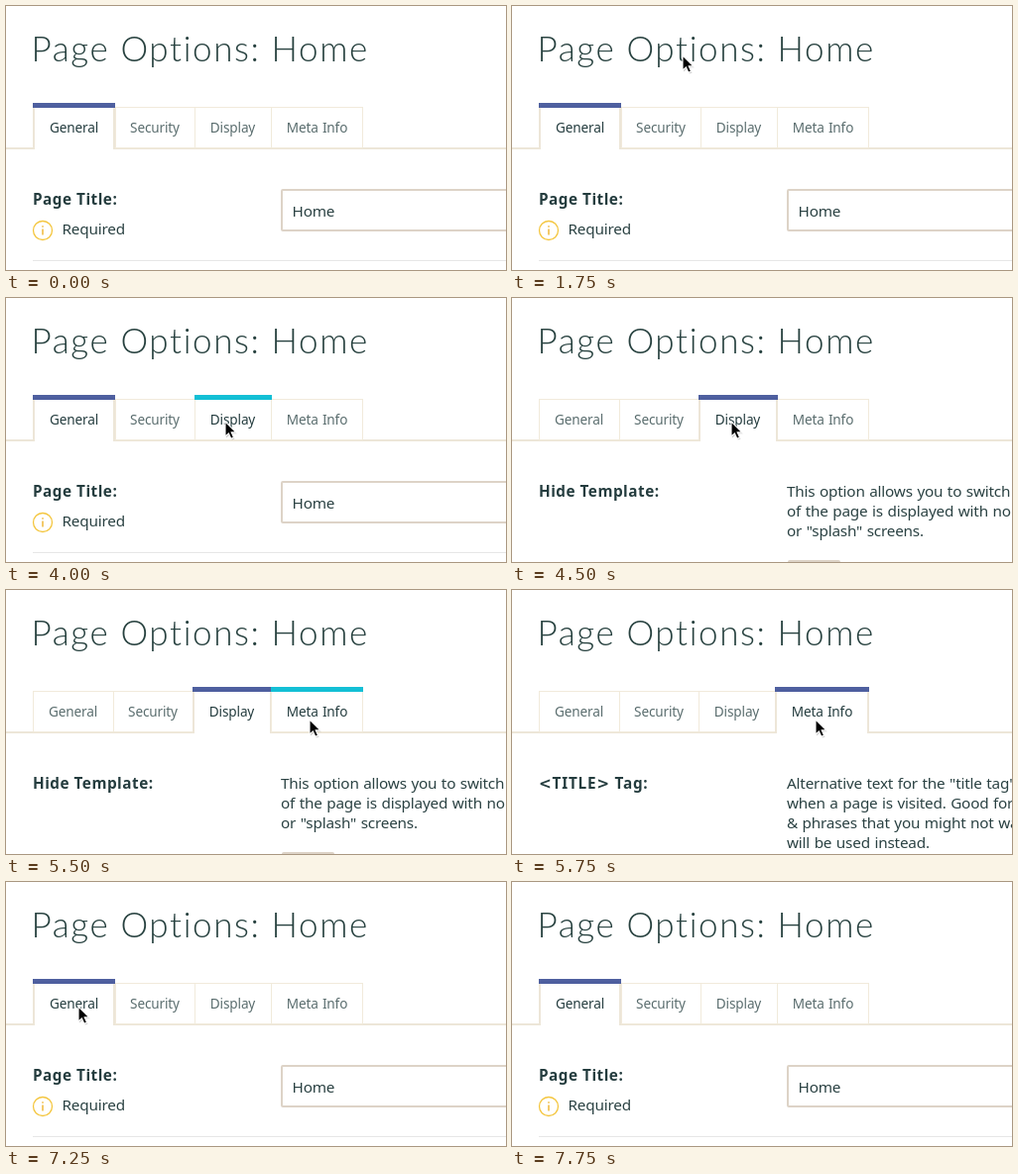
These frames come from a looping animation (504x267 px, 9.5 s). An HTML page:

```html
<!DOCTYPE html>
<html lang="en">
<head>
<meta charset="utf-8">
<title>Page options tabs</title>
<style>
  html, body { margin: 0; width: 100%; height: 100%; overflow: hidden; background: #fff; }
  svg { display: block; width: 100vw; height: 100vh; }
  text { font-family: "Noto Sans", "Open Sans", sans-serif; font-size: 15.3px; letter-spacing: -.2px; word-spacing: .8px; fill: #2b4243; white-space: pre; }
  .title { font: 300 35px Lato, "Open Sans", sans-serif; letter-spacing: 1.6px; word-spacing: 0; fill: #27413f; }
  .label { font-weight: 700; letter-spacing: .5px; word-spacing: 0; fill: #243c3e; }
  .angle { font-family: "DejaVu Sans", sans-serif; }
  .tab text { font-size: 13.6px; letter-spacing: -.15px; text-anchor: middle; fill: #5b6e6f; }
  .tab.lit text { fill: #263e40; }
  .edge { fill: #fff; stroke: #f1eadb; }
  .side { fill: #ede6d8; }
</style>
</head>
<body>
<svg viewBox="0 0 504 267" xmlns="http://www.w3.org/2000/svg">
  <rect width="504" height="267" fill="#fff"/>
  <text class="title" x="25.5" y="56">Page Options: Home</text>
  <rect class="side" y="143" width="504" height="2"/>
  <g id="tabs"></g>

  <g class="panel">
    <text class="label" x="27" y="201">Page Title:</text>
    <circle cx="37" cy="227" r="9.5" fill="none" stroke="#f4c63f" stroke-width="1.3"/>
    <path d="M37 225.5v6M37 222.2v1.6" stroke="#f0b93a" stroke-width="1.5"/>
    <text x="56.5" y="231">Required</text>
    <rect x="278" y="186" width="240" height="41" rx="1" fill="#fff" stroke="#ddd3c7" stroke-width="2"/>
    <text x="288.5" y="213">Home</text>
    <rect x="27" y="257" width="477" height="1" fill="#e6e6e6"/>
  </g>
  <g class="panel">
    <text class="label" x="27" y="201">Hide Template:</text>
    <text x="277" y="201">This option allows you to switch</text>
    <text x="277" y="221">of the page is displayed with no</text>
    <text x="277" y="241">or "splash" screens.</text>
    <rect x="278" y="265" width="53" height="8" rx="2" fill="#ddd3c7"/>
  </g>
  <g class="panel">
    <text class="label" x="27" y="201" style="letter-spacing:.75px"><tspan class="angle">&lt;</tspan>TITLE<tspan class="angle">&gt;</tspan> Tag:</text>
    <text x="277" y="201">Alternative text for the "title tag"</text>
    <text x="277" y="221">when a page is visited. Good for</text>
    <text x="277" y="241">&amp; phrases that you might not want</text>
    <text x="277" y="261">will be used instead.</text>
  </g>

  <g id="cursor">
    <path d="M1 2V16.5L4.3 13.4 6.8 18.6 9.5 17.4 7.2 12.2H11.8Z" fill="#000" opacity=".2"/>
    <path d="M0 0V15L3.4 11.9 5.8 17.3 8.5 16.1 6.2 10.9H10.8Z" fill="#000" stroke="#fff" stroke-width="1.1"/>
  </g>
</svg>
<script>
const LOOP = 9500, STEP = 250, HIDDEN = null;
const TABS = [["General", 81], ["Security", 80], ["Display", 77], ["Meta Info", 93]];
const PANEL_TAB = [0, 2, 3];

// [start time, pointer positions held one step each]
const MOVES = [
  [0, [HIDDEN]],
  [750, [[320, -3], [308, 9], [301, 19]]],
  [1750, [[172, 50], [158, 84], [146, 113], [145, 125], [157, 129]]],
  [3000, [[236, 134], [302, 132], [318, 129], [286, 127], [221, 125]]],
  [4750, [[228, 127], [252, 130], [285, 132], [306, 131]]],
  [6000, [[243, 130], [143, 128], [73, 126]]],
  [7500, [[110, 31], HIDDEN]]
];
const CLICKS = [[0, 0], [4500, 2], [5750, 3], [7250, 0]];

const make = (name, parent, attrs) => {
  const el = document.createElementNS("http://www.w3.org/2000/svg", name);
  parent.appendChild(el);
  return set(el, attrs);
};
function set(el, attrs) {
  for (const key in attrs) el.setAttribute(key, attrs[key]);
  return el;
}
const show = (el, on) => el.setAttribute("visibility", on ? "visible" : "hidden");
const latest = (list, t) => list.filter(item => item[0] <= t).pop();

const cursor = document.getElementById("cursor");
const panels = [...document.querySelectorAll(".panel")];
const tabs = TABS.map(([name]) => {
  const g = make("g", document.getElementById("tabs"), { class: "tab" });
  const tab = {
    g,
    edge: make("rect", g, { class: "edge", y: 102.5, height: 41 }),
    fill: make("rect", g, { fill: "#fff", y: 98, height: 47 }),
    left: make("rect", g, { class: "side", y: 102, width: 2, height: 43 }),
    right: make("rect", g, { class: "side", y: 102, width: 2, height: 43 }),
    bar: make("rect", g, { y: 98, height: 5 }),
    text: make("text", g, { y: 128 })
  };
  tab.text.textContent = name;
  return tab;
});

function pointerAt(t) {
  const [start, points] = latest(MOVES, t);
  return points[Math.min(points.length - 1, Math.floor((t - start) / STEP))];
}

function draw(t) {
  const active = latest(CLICKS, t)[1];
  const point = pointerAt(t);
  let x = 27;

  tabs.forEach((tab, i) => {
    const on = i === active;
    const last = i === tabs.length - 1;
    const w = TABS[i][1] + (on ? 2 : 0);
    const over = !!point && point[1] >= 102 && point[1] < 143 && point[0] >= x && point[0] < x + w;
    const full = last ? w : w + (on && i === 0 ? 0 : 1);
    set(tab.edge, { x: x + .5, width: full - 1 });
    set(tab.fill, { x, width: full });
    set(tab.left, { x });
    set(tab.right, { x: x + full - 2 });
    set(tab.bar, { x, width: full, fill: on ? "#4e5f9f" : "#13bfd5" });
    set(tab.text, { x: x + w / 2 });
    set(tab.g, { class: on || over ? "tab lit" : "tab" });
    [tab.fill, tab.left, tab.right].forEach(el => show(el, on));
    show(tab.edge, !on);
    show(tab.bar, on || over);
    x += w;
  });
  // Raised tab covers its neighbours' edges.
  const parent = tabs[0].g.parentNode;
  if (parent.lastChild !== tabs[active].g) parent.appendChild(tabs[active].g);
  const lit = tabs.find((tab, i) => i !== active && tab.g.getAttribute("class") === "tab lit");
  if (lit) parent.appendChild(lit.g);

  panels.forEach((panel, i) => show(panel, PANEL_TAB[i] === active));
  show(cursor, !!point);
  if (point) set(cursor, { transform: `translate(${point})` });
}

const begin = performance.now();
function tick() {
  draw((performance.now() - begin) % LOOP);
  requestAnimationFrame(tick);
}
tick();
</script>
</body>
</html>
```
